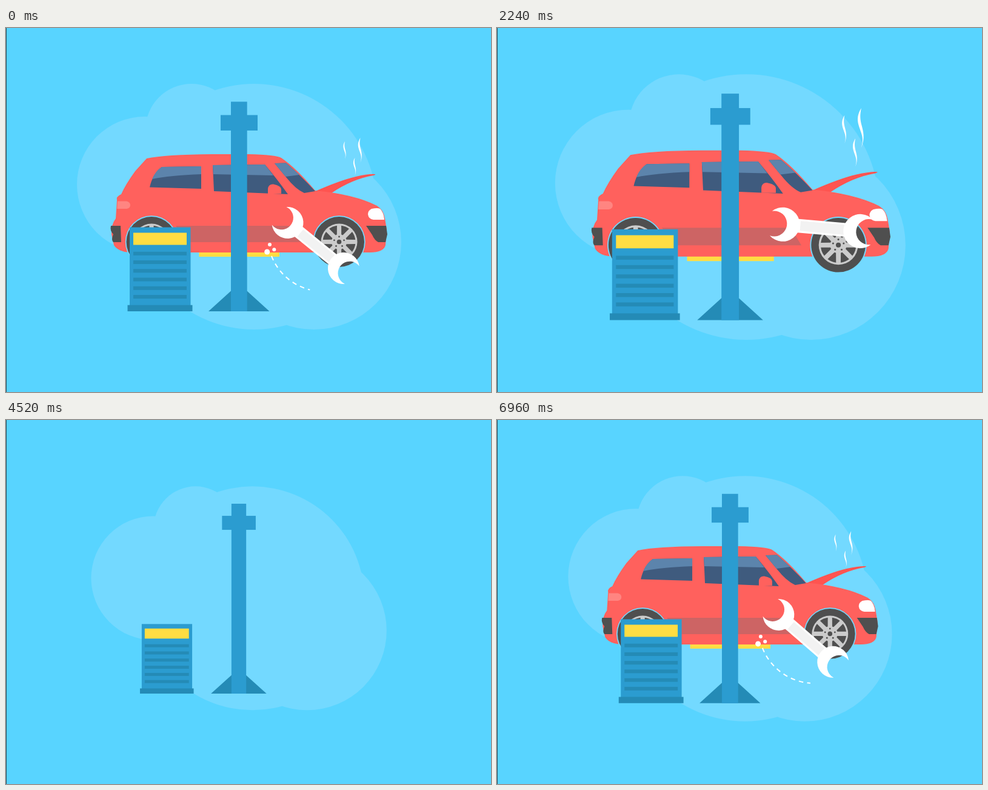
Animation of 800 by 600 pixels, one loop 7 s. Source, as an HTML page with a canvas:

```html
<!DOCTYPE html>
<html lang="en">
<head>
<meta charset="utf-8">
<title>Car service</title>
<style>
  html, body { margin: 0; width: 100%; height: 100%; overflow: hidden; background: #58d4ff; }
  canvas { display: block; }
</style>
</head>
<body>
<canvas id="stage" width="800" height="600"></canvas>
<script>
const ctx = document.getElementById('stage').getContext('2d');
const LOOP = 7000, STEP = 40, RAD = Math.PI / 180;
const SKY = '#58d4ff', CLOUD = '#73d9ff', STEEL = '#2b9cd0', STEEL_DARK = '#248bb6',
  YELLOW = '#ffdd43', RED = '#ff615d', HOOD = '#ff5450', STRIP = '#cd6464',
  GLASS = '#3f5b7e', GLASS_LIGHT = '#5c84ac', RUBBER = '#4f4f4f', RIM = '#cbcbcb';

const clamp = x => Math.max(0, Math.min(1, x));
const span = (t, from, to) => clamp((t - from) / (to - from));
const smooth = p => p * p * (3 - 2 * p);
const easeOut = p => 1 - (1 - p) ** 3;
const back = (p, s) => 1 + (s + 1) * (p - 1) ** 3 + s * (p - 1) ** 2;

function rect(color, x, y, w, h) {
  ctx.fillStyle = color;
  ctx.fillRect(x, y, w, h);
}
function disc(color, x, y, r) {
  ctx.fillStyle = color;
  ctx.beginPath();
  ctx.arc(x, y, r, 0, 2 * Math.PI);
  ctx.fill();
}
function shape(color, d) {
  ctx.fillStyle = color;
  ctx.fill(new Path2D(d));
}
function group(x, y, sx, sy, angle, draw) {
  if (sx <= 0 || sy <= 0) return;
  ctx.save();
  ctx.translate(x, y);
  ctx.rotate(angle);
  ctx.scale(sx, sy);
  draw();
  ctx.restore();
}
function popFrom(x, y, sx, sy, draw) {
  group(x, y, sx, sy, 0, () => { ctx.translate(-x, -y); draw(); });
}

function cloud() {
  ctx.fillStyle = CLOUD;
  ctx.beginPath();
  for (const [x, y, r] of [[229, 258, 112], [306, 168, 76], [409, 294.5, 202.5], [508, 353, 144]]) {
    ctx.moveTo(x + r, y);
    ctx.arc(x, y, r, 0, 2 * Math.PI);
  }
  ctx.fill();
}

function wheel(x, y) {
  disc(CLOUD, x, y, 43.2);
  disc(RUBBER, x, y, 41.5);
  disc(RIM, x, y, 30);
  for (let i = 0; i < 8; i++) {
    group(x, y, 1, 1, (i + 0.5) * 45 * RAD, () => {
      ctx.fillStyle = RUBBER;
      ctx.beginPath();
      ctx.moveTo(12.5, -1.2);
      ctx.arc(0, 0, 27, -0.26, 0.26);
      ctx.lineTo(12.5, 1.2);
      ctx.fill();
    });
  }
  disc(RUBBER, x, y, 3.8);
  for (let i = 0; i < 5; i++) {
    const a = (i * 72 - 90) * RAD;
    disc(RUBBER, x + 8.5 * Math.cos(a), y + 8.5 * Math.sin(a), 1.4);
  }
}

function hood(t) {
  const open = time => {
    const p = span(time, -1.3, -0.9);
    return p ? back(p, 1.7) : 0;
  };
  const draw = amount => group(511, 268, 1, 1, (1 - amount) * 29 * RAD, () =>
    shape(HOOD, 'M-3 2Q40 -17 66 -23Q88 -28 98 -27Q99 -26 95 -25Q60 -19 26 4Z'));
  const sweep = Math.abs(open(t + 0.04) - open(t - 0.04));
  if (sweep < 0.01) {
    if (open(t)) draw(open(t));
    return;
  }
  ctx.globalAlpha = 0.25;
  for (let i = 0; i < 9; i++) draw(open(t - 0.04 + i * 0.01));
  ctx.globalAlpha = 1;
}

function car(t) {
  hood(t);
  shape(RED, `M232 215Q262 208.5 340 208L400 208Q445 209 454 214Q478 230 510 268
    Q575 274 612 293Q623 300 625 314L628 332L626 358Q623 370 600 370L205 370
    Q185 369 178 358L174 340Q173 324 181 314L183 284Q181 278 190 274Q197 258 213 236Z`);
  shape(STRIP, 'M280 326H477L493 353H300Z');
  shape(GLASS, 'M257 229L322 228V265L237 262.5Q242 240 257 229Z');
  shape(GLASS_LIGHT, 'M257 229L322 228V241Q270 243 241 249Q247 235 257 229Z');
  shape(GLASS, 'M341 226L427 225Q448 250 465 274L343 269Z');
  shape(GLASS_LIGHT, 'M341 226L427 225L441 243L342 241Z');
  shape(GLASS, 'M443 223L462 222.5Q487 244 510 269L492 272Q478 266 462 246Z');
  shape(GLASS_LIGHT, 'M443 223L462 222.5L484 242L461 245Z');
  shape(RED, 'M432 273V265Q433 257 441 257.5Q454 260 454 266V273Z');
  shape('#ff8581', 'M184 285.5H199Q205 287 205 292Q205 297 199 298H183Z');
  shape(RUBBER, 'M173 326H189L190 353H177Q173 349 177 340Q171 334 173 326Z');
  shape(RUBBER, 'M594 326H627L629 340L626 353H614Q608 350 604 341Z');
  shape('#fff', 'M603 298Q613 296 617 298Q623 304 624 316H606Q598 315 597 307Q597 301 603 298Z');
  wheel(240, 352.5);
  wheel(549.5, 352.5);
}

function pole() {
  shape(STEEL_DARK, 'M334 467L371.5 433H397L434.5 467Z');
  rect(STEEL, 371, 121.5, 26.7, 345.5);
  rect(STEEL, 354, 143.5, 61, 25.5);
}

function toolbox() {
  rect(STEEL, 204, 328.5, 100.5, 129);
  rect(STEEL_DARK, 200.5, 456.7, 107, 10.3);
  rect(YELLOW, 210, 337.5, 88, 20);
  for (let i = 0; i < 6; i++) rect(STEEL_DARK, 210, 368.8 + i * 14.25, 88, 6);
}

function steam(t) {
  const grow = span(t, -0.95, 0.45);
  if (!grow) return;
  for (const [x, y, rise, height] of [[559, 216, 8.3, 43], [584.5, 222, 8, 60.5], [575.5, 243, 4.5, 43]]) {
    const s = grow * height / 60;
    group(x, y - rise * t, s, s, 0, () =>
      shape('#fff', 'M0 0C5 -16 -1 -23 -4 -34C-7 -44 -5 -52 0 -60C-2 -50 -2 -45 0 -36C3 -25 6 -15 0 0Z'));
  }
}

function jaw() {
  ctx.beginPath();
  ctx.arc(0, 0, 26, -133.4 * RAD, 133.4 * RAD);
  ctx.arc(-13, 0, 19.5, 104.5 * RAD, -104.5 * RAD, true);
  ctx.fillStyle = '#fff';
  ctx.fill();
}

function wrench(t) {
  const size = easeOut(span(t, -0.65, -0.35));
  const angle = 43 - 38 * smooth(span(t, -0.14, 0.56));
  group(464.5, 321, size, size, angle * RAD, () => {
    rect('#fff', 18, -10.5, 83, 21);
    rect('#f2f2f2', 27, -7.5, 67, 15);
    jaw();
    group(119, 0, 1, 1, Math.PI, jaw);
  });
}

function sparks(t) {
  const head = 90 + 68.5 * span(t, -0.32, -0.1);
  const tail = 94 + 250 * Math.max(0, t + 0.04);
  if (tail < head) {
    ctx.strokeStyle = '#fff';
    ctx.lineWidth = 2;
    ctx.setLineDash([7.5, 6.5]);
    ctx.beginPath();
    ctx.arc(523.5, 342.3, 91.9, head * RAD, tail * RAD, true);
    ctx.stroke();
    ctx.setLineDash([]);
  }
  const size = span(t, -0.16, -0.08) * (1 - span(t, 0.08, 0.24));
  if (size) {
    disc('#fff', 430.7, 369, 4.5 * size);
    disc('#fff', 435, 357, 3 * size);
    disc('#fff', 442.3, 365.3, 3 * size);
  }
}

function scene(t) {
  const cloudSize = easeOut(span(t, -3, -2.6));
  popFrom(385, 295, cloudSize, cloudSize, cloud);

  const lift = span(t, -1.7, -0.9);
  const drop = 74 * (1 - (lift ? back(lift, 1.2) : 0));
  const carSize = easeOut(span(t, -2.5, -2));
  popFrom(385, 467, carSize, carSize, () => {
    ctx.translate(0, drop);
    rect(YELLOW, 318.5, 369.5, 132.5, 7.5);
    car(t);
  });

  popFrom(384, 467, 1, easeOut(span(t, -2.85, -2.4)), pole);
  const boxSize = easeOut(span(t, -2.7, -2.3));
  popFrom(254, 467, boxSize, boxSize, toolbox);
  steam(t);
  wrench(t);
  sparks(t);
}

function render(ms) {
  const clock = ms / 1000;
  // The scene builds up during the last three seconds before the loop point.
  const t = clock >= 3.9 ? clock - 7 : clock;
  const zoom = 1 + 0.0359 * t;
  rect(SKY, 0, 0, 800, 600);
  group(380.5, 287, zoom, zoom, 0, () => {
    ctx.translate(-380.5, -287);
    scene(t);
  });
  if (t > 3.6) disc(SKY, 400, 300, (t - 3.6) * 1350);
  rect('#234a58', 0, 0, 1, 600);
}

const start = performance.now();
function tick() {
  const elapsed = (performance.now() - start) % LOOP;
  render(Math.floor(elapsed / STEP) * STEP);
  requestAnimationFrame(tick);
}
tick();
</script>
</body>
</html>
```
